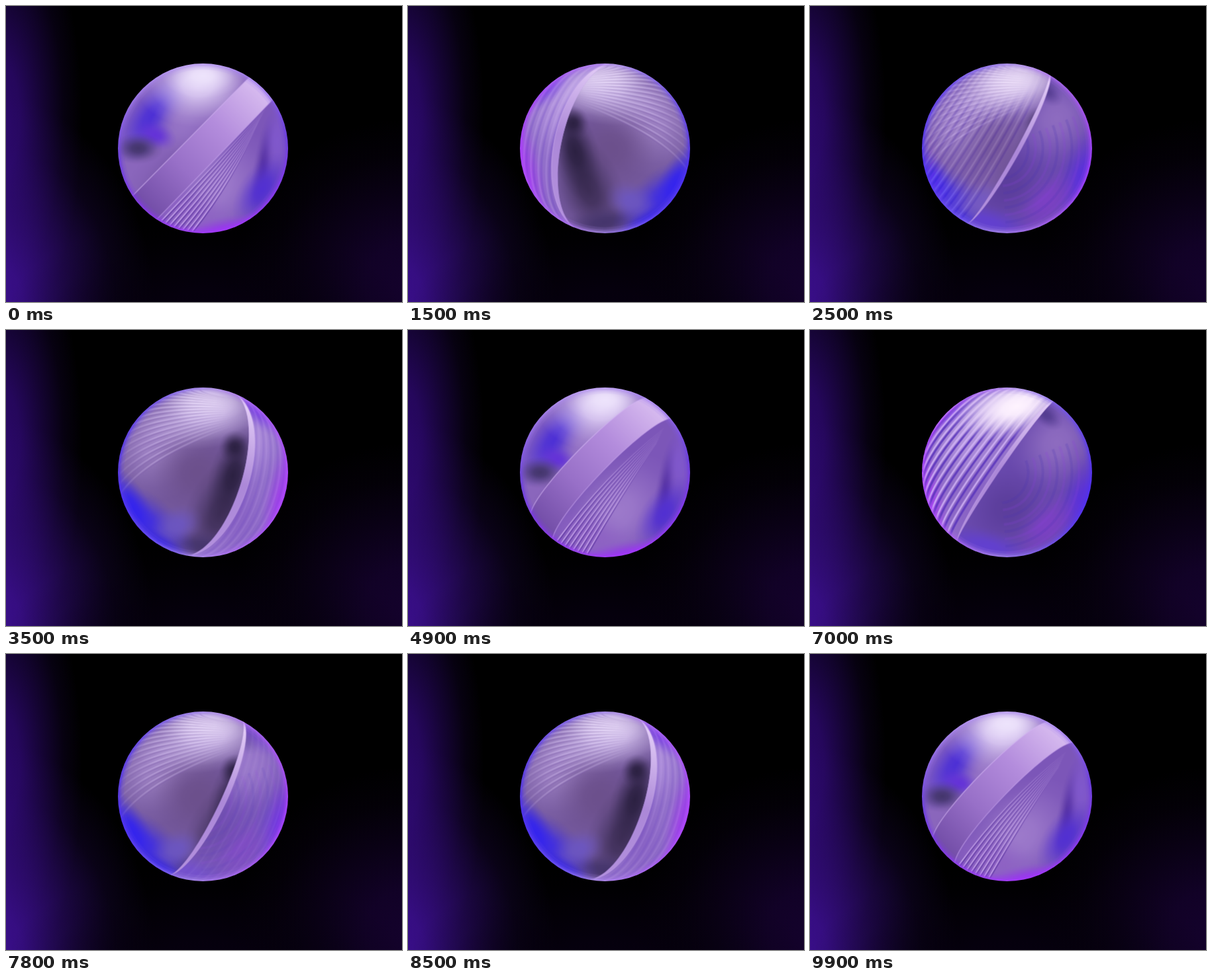
Animation of 598 by 448 pixels, one loop 10 s. Source, as an HTML page with a canvas:

```html
<!DOCTYPE html>
<html>
<head>
<meta charset="utf-8">
<style>
  html, body { margin: 0; width: 100%; height: 100%; overflow: hidden; background: #000; }
  canvas { display: block; }
</style>
</head>
<body>
<canvas id="stage" width="598" height="448"></canvas>
<script>
const R = 128, HALF = R + 3, CX = 297.5, CY = 215.5, LOOP = 5000;
const stage = document.getElementById('stage').getContext('2d');
const clamp = (v, lo = 0, hi = 1) => Math.min(hi, Math.max(lo, v));
const ramp = (v, a, b) => { const k = clamp((v - a) / (b - a)); return k * k * (3 - 2 * k); };
const onRim = (deg, r = R) => [r * Math.cos(deg * Math.PI / 180), r * Math.sin(deg * Math.PI / 180)];

function makeCanvas(w, h, cx, cy) {
  const c = document.createElement('canvas');
  c.width = w;
  c.height = h;
  const g = c.getContext('2d');
  g.translate(cx, cy);
  return g;
}
const makeBall = () => makeCanvas(2 * HALF, 2 * HALF, HALF, HALF);

function flood(g, fill) {
  g.fillStyle = fill;
  g.fillRect(-HALF, -HALF, 2 * HALF, 2 * HALF);
}

// Soft elliptical patch of light
function soft(g, x, y, rx, ry, tilt, color) {
  g.save();
  g.translate(x, y);
  g.rotate(tilt * Math.PI / 180);
  g.scale(rx, ry);
  const f = g.createRadialGradient(0, 0, 0, 0, 0, 1);
  [['ff', 0], ['e0', .25], ['80', .52], ['28', .78], ['00', 1]].forEach(([a, p]) => f.addColorStop(p, color + a));
  g.fillStyle = f;
  g.fillRect(-1, -1, 2, 2);
  g.restore();
}

function gradient(g, x0, y0, x1, y1, ...colors) {
  const f = g.createLinearGradient(x0, y0, x1, y1);
  colors.forEach((c, i) => f.addColorStop(i / (colors.length - 1), c));
  return f;
}

function surface(base, patches, extra) {
  const g = makeBall();
  flood(g, base);
  patches.forEach(p => soft(g, ...p));
  if (extra) extra(g);
  return g.canvas;
}

const smooth = surface('#8a66bc', [
  [-35, 60, 110, 70, -45, '#70509f'],
  [-75, -50, 42, 88, 40, '#4c2fd6'],
  [-30, -40, 55, 45, -45, '#9674c6'],
  [-8, -94, 92, 62, 0, '#dccbf3'],
  [0, -110, 62, 34, 0, '#eee4fc'],
  [-72, -20, 34, 22, 20, '#6432d8'],
  [-98, 0, 38, 24, 0, '#44366c']
]);

const lower = surface('#7c56b8', [
  [20, 60, 105, 80, -45, '#9d7acb'],
  [-20, 100, 85, 45, 20, '#8e62c4'],
  [92, 25, 16, 85, 10, '#5632a4'],
  [112, -10, 24, 70, 0, '#8058cc'],
  [90, 62, 34, 65, 35, '#5230d2'],
  [35, 124, 95, 22, -10, '#9438e8']
]);

const glass = surface('#6a4aae', [
  [75, -45, 70, 80, 40, '#8e6cc0'],
  [58, -88, 32, 18, 40, '#543c90'],
  [0, 55, 75, 70, -50, '#5c3e9c'],
  [-30, 112, 90, 28, 15, '#6240d0'],
  [115, 45, 40, 90, 20, '#5a30dc'],
  [60, 80, 65, 35, -45, '#7c40c4']
], g => {
  g.lineWidth = 4;
  for (let i = 0; i < 8; i++) {
    g.strokeStyle = i % 2 ? '#8840d830' : '#4830b030';
    g.beginPath();
    g.ellipse(-10, 0, 42 + i * 11, 46 + i * 11, 0, -.4, 1.5);
    g.stroke();
  }
});

// Hollow side, opening towards the left
const hollow = surface('#75599f', [
  [-70, -45, 90, 85, -45, '#a084c6'],
  [-10, 0, 85, 80, -30, '#6c508c'],
  [25, 62, 52, 90, 22, '#3f2f58'],
  [45, 5, 36, 78, 15, '#2c2142'],
  [0, 112, 70, 26, 10, '#45356c'],
  [-78, 75, 85, 36, 42, '#4834d8'],
  [-40, 80, 42, 30, -20, '#6c56c0'],
  [-105, 55, 26, 75, -28, '#3424ee'],
  [-70, 108, 70, 20, 30, '#3020e8'],
  [5, -88, 110, 52, -8, '#d2bfec'],
  [0, -108, 70, 34, 0, '#f0e4fd'],
  [48, -38, 24, 26, 0, '#2c2142']
], g => {
  g.lineWidth = 2.6;
  for (let i = 0; i < 18; i++) {
    const [x, y] = onRim(166 + i * 6);
    [['#e0ccfa', 0], ['#7c5ca8', 2.6]].forEach(([c, d]) => {
      g.strokeStyle = gradient(g, -R, 0, 50, 0, c + '10', c + '58', c + '48', c + '00');
      g.beginPath();
      g.moveTo(x, y + d);
      g.quadraticCurveTo(x * .64, y * .72 - 52 + d + i * 1.4, 62, -76 - i * 2);
      g.stroke();
    });
  }
});

const outside = surface('#9270ca', [
  [-45, 55, 60, 100, 15, '#8862c4'],
  [-60, -55, 70, 75, 30, '#b496de'],
  [-120, 40, 30, 120, -12, '#a040ea'],
  [-82, -95, 55, 22, -45, '#7c44e4']
]);

// Arc across the ball: lower end, upper end (degrees), sideways bulge
function seam(g, [a1, a2, h]) {
  const [x1, y1] = onRim(a1), [x2, y2] = onRim(a2);
  const dx = x2 - x1, dy = y2 - y1, len = Math.hypot(dx, dy) || 1;
  const ox = -dy / len * h * 4 / 3, oy = dx / len * h * 4 / 3, k = .13;
  g.moveTo(x1, y1);
  g.bezierCurveTo(x1 + dx * k + ox, y1 + dy * k + oy, x2 - dx * k + ox, y2 - dy * k + oy, x2, y2);
}

function sidePath(g, s, right) {
  const rad = Math.PI / 180;
  g.beginPath();
  seam(g, s);
  g.arc(0, 0, R + 20, s[1] * rad, s[0] * rad, !right);
  g.closePath();
}

function within(g, s, right, draw) {
  g.save();
  sidePath(g, s, right);
  g.clip();
  draw();
  g.restore();
}

function strokeSeam(g, s, color, width) {
  g.beginPath();
  seam(g, s);
  g.strokeStyle = color;
  g.lineWidth = width;
  g.stroke();
}

function paint(g, picture, alpha = 1, flip = false) {
  g.save();
  g.globalAlpha *= alpha;
  if (flip) g.scale(-1, 1);
  g.drawImage(picture, -HALF, -HALF);
  g.restore();
}

function edgeGlow(g, fill) {
  g.strokeStyle = fill;
  [[16, .14], [9, .25], [4, .5]].forEach(([w, a]) => {
    g.globalAlpha = a;
    g.lineWidth = w;
    g.beginPath();
    g.arc(0, 0, R - .5, 0, 7);
    g.stroke();
  });
  g.globalAlpha = 1;
}

// Broad smooth strap passing over the front
function drawStrap(g, t) {
  const b = Math.sin(clamp((t > LOOP / 2 ? t - LOOP : t) / 10, -88, 88) * Math.PI / 180);
  const top = [146 - 30 * b, -57 + 27 * b, 90 * b];
  const bottom = [123 - 30 * b, -35 + 27 * b, 100 * b];
  paint(g, lower);
  for (let i = 1; i < 9; i++) {
    const [x, y] = onRim(bottom[0] - i * 3.2, R - 2);
    const [ex, ey] = onRim(bottom[1] + 2, R - 14 - i * 2);
    const cx = (x + ex) / 2 + 70 * b + i * 1.5, cy = (y + ey) / 2 + 70 * b + i * 1.5;
    [['#5c35a0', 1.5], ['#d4b4f4', 0]].forEach(([c, d]) => {
      g.strokeStyle = gradient(g, x, y, ex, ey, c + 'e0', c + '78', c + '10');
      g.lineWidth = 1.5;
      g.beginPath();
      g.moveTo(x + d, y + d);
      g.quadraticCurveTo(cx + d, cy + d, ex, ey + i * 2);
      g.stroke();
    });
  }
  within(g, bottom, false, () => flood(g, gradient(g, -90, 90, 88, -88, '#714ca6', '#9870c8', '#b48ddd', '#d8bcf0')));
  within(g, top, false, () => paint(g, smooth));
  strokeSeam(g, top, '#d2b4f2b0', 1.3);
  strokeSeam(g, bottom, '#c8a4eeb0', 1.2);
  edgeGlow(g, gradient(g, -20, -R, 20, R, '#b898f4', '#6434e8', '#a838ff'));
}

// Time, then lower end, upper end and bulge of the lip's hollow-side edge
const keys = [
  [1000, 140, -140, -20], [1500, 112, -87, -45], [2000, 126, -57, -7],
  [3500, 100, -66, 44], [4000, 60, -40, 30]
];
function shellSeam(t) {
  t = clamp(t, 1000, 3999);
  const i = keys.findIndex(k => k[0] > t) - 1;
  const p = keys[i], q = keys[i + 1], k = (t - p[0]) / (q[0] - p[0]);
  return [1, 2, 3].map(j => p[j] + (q[j] - p[j]) * k);
}

function ribs(g, s, dir, strength) {
  g.save();
  g.globalAlpha *= strength;
  for (let i = 1; i < 13; i++) {
    const line = d => [s[0] - dir * (i * 6 + d), s[1] + dir * (i * 4.5 + d), s[2] + dir * i * 1.4];
    strokeSeam(g, line(0), '#5b35bc', 3.2);
    strokeSeam(g, line(2.4), '#d2b4f6', 2.6);
  }
  g.restore();
}

// Ribbed half shell with a thin lip
function drawShell(g, t) {
  const s = shellSeam(t), h = s[2];
  const open = ramp(Math.abs(h), 10, 34), turned = h > 0;
  const mid = ramp(h, -4, 18);
  const exterior = (dir, alpha) => {
    paint(g, outside, alpha, dir > 0);
    ribs(g, s, dir, alpha * (dir < 0 ? .85 - .65 * open : .12));
  };
  paint(g, glass);
  if (turned) exterior(1, open);
  else paint(g, hollow, open, true);
  within(g, s, false, () => {
    exterior(-1, 1);
    soft(g, 0, -100, 100, 48, -15, '#d8c2f2');
    g.globalAlpha = 1 - open;
    soft(g, 15, -100, 90, 46, -20, '#fff4ff');
    g.globalAlpha = 1;
    paint(g, hollow, mid);
  });
  // The lip lies on the exterior side of the seam
  const w = 5 + 5 * open;
  const outer = [s[0], s[1] + (turned ? 1 : -1), h + (turned ? w : -w)];
  const [from, to] = turned ? [s, outer] : [outer, s];
  within(g, to, false, () => within(g, from, true, () =>
    flood(g, gradient(g, 40, -R, -40, R, '#ecd8fc', '#ac88d8', '#b492de'))));
  strokeSeam(g, outer, '#d0b0f080', 1);
  const magenta = '#b040ff', blue = '#4a2cf4';
  edgeGlow(g, gradient(g, -R, 10, R, 40, turned ? blue : magenta, '#b090ee', turned ? magenta : blue));
}

const backdrop = makeCanvas(598, 448, 0, 0);
backdrop.fillRect(0, 0, 598, 448);
soft(backdrop, -10, 170, 125, 340, 0, '#2a0868');
soft(backdrop, -40, 460, 265, 330, 0, '#3c0f90');
soft(backdrop, 610, 420, 270, 250, 0, '#14022c');
soft(backdrop, 300, 470, 300, 150, 0, '#06000f');

const strap = makeBall(), shell = makeBall();

function frame(now) {
  const t = Math.floor(now / 100) * 100 % LOOP;
  const mix = ramp(t, 700, 1250) * (1 - ramp(t, 3800, 4450));
  stage.drawImage(backdrop.canvas, 0, 0);
  stage.save();
  stage.translate(CX, CY);
  stage.beginPath();
  stage.arc(0, 0, R + .5, 0, 7);
  stage.clip();
  if (mix < 1) {
    drawStrap(strap, t);
    paint(stage, strap.canvas);
  }
  if (mix > 0) {
    drawShell(shell, t);
    paint(stage, shell.canvas, mix);
  }
  stage.restore();
  requestAnimationFrame(frame);
}
frame(performance.now());
</script>
</body>
</html>
```
